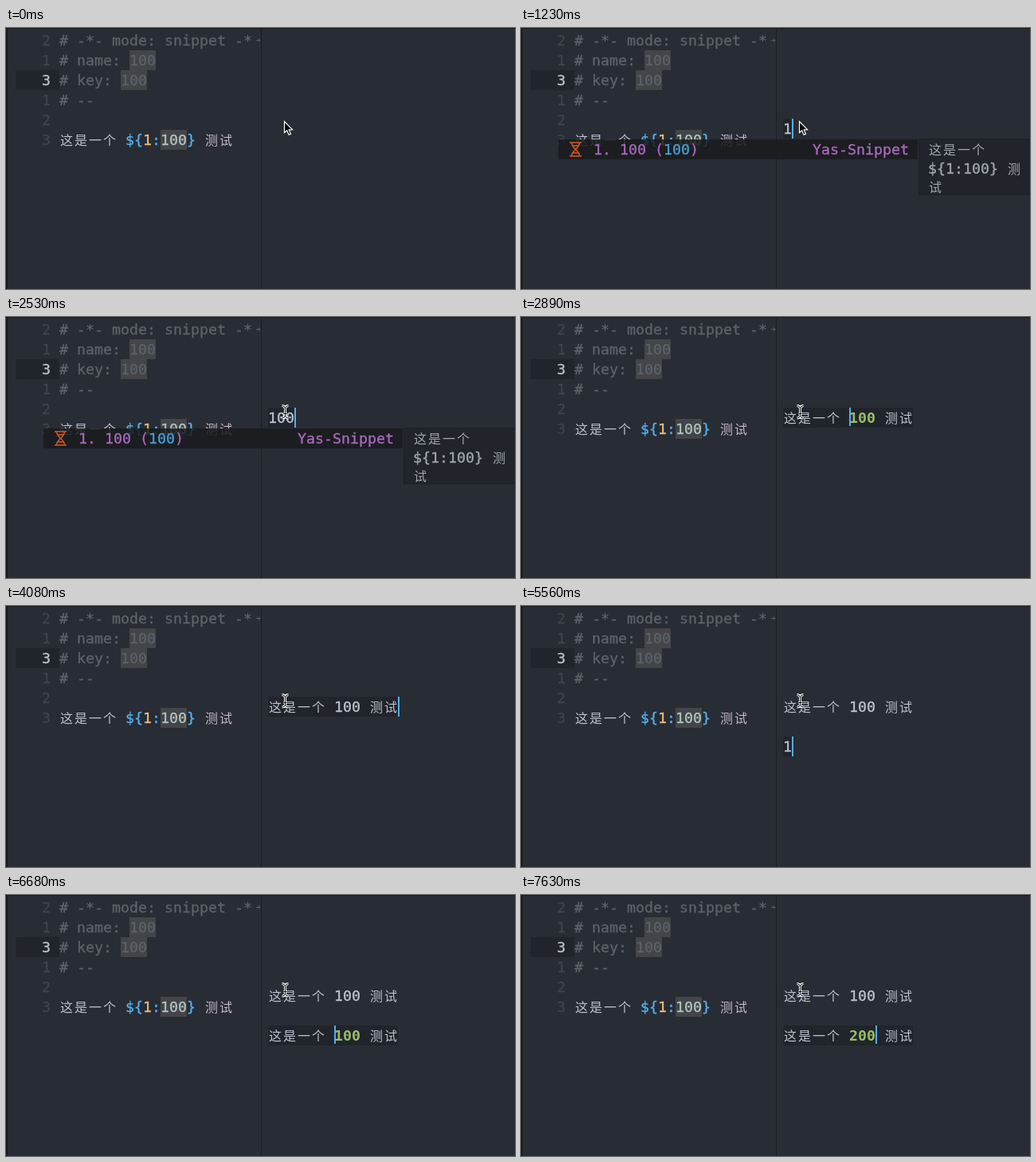
An HTML page with a canvas for the animation above (8000 ms loop, 639 by 328 pixels).

```html
<!DOCTYPE html>
<html lang="zh">
<head>
<meta charset="utf-8">
<title>Snippet expansion</title>
<style>
html, body { margin: 0; width: 100%; height: 100%; overflow: hidden; background: #282c34; }
canvas { display: block; }
</style>
</head>
<body>
<canvas id="stage" width="639" height="328"></canvas>
<script>
const ctx = document.getElementById('stage').getContext('2d');
const LOOP = 8000, CELL = 11, WIDE = 18, ROW = 25;
const LEFT_X = 67, LEFT_Y = 3, RIGHT_X = 329, RIGHT_Y = 114;

const C = {
  bg: '#282c34', line: '#21242b', edge: '#17191e', dim: '#3f444a',
  comment: '#5b6268', fg: '#bbc2cf', mark: '#434548', blue: '#51afef',
  orange: '#ecbe7b', green: '#98be65', value: '#b0c4bf', pink: '#c3b7c7',
  purple: '#a968bd', doc: '#a0a5ae', icon: '#cf5625'
};

const snippet = n => `这是一个 ${n} 测试`;

// Each step overrides part of the state: row, col and on describe the caret.
const steps = [
  [0, { first: '', third: '', row: 0, col: 0, on: false, block: false, popup: false, beam: false, field: -1 }],
  [410, { on: true, block: true }],
  [470, { block: false }],
  [940, { on: false }],
  [1000, { first: '1', col: 1, on: true }],
  [1230, { popup: true }],
  [1290, { first: '10', col: 2, popup: false }],
  [1470, { beam: true }],
  [1530, { popup: true }],
  [1580, { first: '100', col: 3, popup: false }],
  [1810, { popup: true }],
  [2050, { on: false }],
  [2530, { on: true }],
  [2890, { first: snippet(100), col: 5, field: 0, popup: false }],
  [3370, { on: false }],
  [3900, { on: true }],
  [4080, { col: 11, field: -1 }],
  [4620, { on: false }],
  [4850, { row: 1, col: 0, on: true }],
  [5270, { row: 2 }],
  [5560, { third: '1', col: 1 }],
  [5800, { popup: true }],
  [5860, { third: '10', col: 2, popup: false }],
  [5970, { third: '100', col: 3 }],
  [6210, { popup: true }],
  [6500, { on: false }],
  [6680, { third: snippet(100), col: 5, field: 2, on: true, popup: false }],
  [7160, { on: false }],
  [7220, { third: snippet(2), col: 6, on: true }],
  [7520, { third: snippet(20), col: 7 }],
  [7630, { third: snippet(200), col: 8 }]
];

function stateAt(t) {
  return Object.assign({}, ...steps.filter(s => s[0] <= t).map(s => s[1]));
}

const isWide = ch => ch > '\u2fff';
const widthOf = s => [...s].reduce((w, ch) => w + (isWide(ch) ? WIDE : CELL), 0);

function rect(x, y, w, h, color) {
  ctx.fillStyle = color;
  ctx.fillRect(x, y, w, h);
}

// Draws on the editor's character grid and returns the end position.
// A hairline stroke gives Latin text its medium weight.
function write(s, x, base, color, bold = false) {
  ctx.fillStyle = ctx.strokeStyle = color;
  ctx.textAlign = 'center';
  ctx.lineWidth = 0.35;
  for (const ch of s) {
    const wide = isWide(ch);
    const w = wide ? WIDE : CELL;
    ctx.font = wide
      ? '16px "Noto Sans CJK SC", "Noto Sans CJK", sans-serif'
      : `${bold ? 'bold ' : ''}18.27px "DejaVu Sans Mono", monospace`;
    ctx.fillText(ch, x + w / 2, base);
    if (!wide && !bold) ctx.strokeText(ch, x + w / 2, base);
    x += w;
  }
  return x;
}

function writeAll(parts, x, base) {
  for (const [s, color, bold] of parts) x = write(s, x, base, color, bold);
}

function path(points, close) {
  ctx.beginPath();
  points.forEach(([x, y]) => ctx.lineTo(x, y));
  if (close) ctx.closePath();
}

function drawLeft() {
  const top = i => LEFT_Y + i * ROW;
  const base = i => top(i) + 19;
  rect(12, top(2), 55, ROW, C.line);
  rect(155, top(1), 33, ROW, C.mark);
  rect(144, top(2), 33, ROW, C.mark);
  rect(194, top(5), 33, ROW, C.mark);
  [...'213123'].forEach((n, i) => write(n, 45, base(i), i === 2 ? C.fg : C.dim));
  ['# -*- mode: snippet -*', '# name: 100', '# key: 100', '# --']
    .forEach((s, i) => write(s, LEFT_X, base(i), C.comment));
  writeAll([
    ['这是一个 ', C.fg], ['${', C.blue], ['1', C.orange], [':', C.blue],
    ['100', C.value], ['}', C.blue], [' 测试', C.pink]
  ], LEFT_X, base(5));

  // Truncation arrow in the fringe.
  ctx.strokeStyle = C.comment;
  ctx.lineWidth = 1;
  path([[314, 15.5], [319, 15.5]]);
  ctx.stroke();
  path([[316.5, 13], [319, 15.5], [316.5, 18]]);
  ctx.stroke();
}

function drawRight(s) {
  const lines = [s.first, '', s.third];
  const top = RIGHT_Y + s.row * ROW;
  rect(RIGHT_X, top, widthOf(lines[s.row]), ROW, C.line);
  lines.forEach((text, i) => {
    const parts = text.split(/(\d+)/).map(p => {
      const live = i === s.field && /\d/.test(p);
      return [p, live ? C.green : C.fg, live];
    });
    writeAll(parts, RIGHT_X, RIGHT_Y + i * ROW + 19);
  });
  if (s.on) {
    const x = RIGHT_X + widthOf(lines[s.row].slice(0, s.col));
    rect(x, top, s.block ? CELL : 2, s.field < 0 ? ROW : 23, C.blue);
  }
}

function drawHourglass(x, y) {
  ctx.strokeStyle = ctx.fillStyle = C.icon;
  ctx.lineWidth = 1.6;
  path([[x, y + 1], [x + 15, y + 1]]);
  ctx.stroke();
  path([[x, y + 18], [x + 15, y + 18]]);
  ctx.stroke();
  ctx.beginPath();
  ctx.moveTo(x + 2.5, y + 1);
  ctx.bezierCurveTo(x + 2.5, y + 9, x + 12.5, y + 10, x + 12.5, y + 18);
  ctx.moveTo(x + 12.5, y + 1);
  ctx.bezierCurveTo(x + 12.5, y + 9, x + 2.5, y + 10, x + 2.5, y + 18);
  ctx.stroke();
  path([[x + 4, y + 5], [x + 11, y + 5]]);
  ctx.stroke();
  path([[x + 4, y + 14], [x + 11, y + 14]]);
  ctx.stroke();
}

function drawPopup(y) {
  rect(47, y + 1, 451, 25, 'rgba(25,27,30,0.86)');
  rect(500, y + 1, 139, 70, 'rgba(33,36,42,0.95)');
  ctx.strokeStyle = '#1d2025';
  ctx.lineWidth = 1;
  ctx.strokeRect(499.5, y + 0.5, 140, 70);
  drawHourglass(61, y + 4);
  const base = y + 20;
  writeAll([['1. 100 (', C.purple], ['100', '#4a9fd6'], [')', C.purple]], 91, base);
  write('Yas-Snippet', 366, base, C.purple);
  write('这是一个', 511, base, C.doc);
  write('${1:100} 测', 511, base + 24, C.doc);
  write('试', 511, base + 47, C.doc);
}

function drawArrow() {
  const shape = [[0, 0], [0, 14], [3.2, 11.2], [5.6, 16.8], [8, 15.7], [5.7, 10.4], [10, 10.2]];
  path(shape.map(([x, y]) => [x + 349.5, y + 117.5]), true);
  ctx.fillStyle = '#000';
  ctx.fill();
  ctx.strokeStyle = '#fff';
  ctx.lineWidth = 1.2;
  ctx.stroke();
}

function drawBeam() {
  for (const [color, width] of [['#fff', 3], ['#111', 1]]) {
    ctx.strokeStyle = color;
    ctx.lineWidth = width;
    ctx.beginPath();
    ctx.moveTo(346.5, 111.5);
    ctx.quadraticCurveTo(350, 111.5, 350.5, 115);
    ctx.quadraticCurveTo(351, 111.5, 354.5, 111.5);
    ctx.moveTo(350.5, 115);
    ctx.lineTo(350.5, 124);
    ctx.moveTo(346.5, 127);
    ctx.quadraticCurveTo(350, 127, 350.5, 124);
    ctx.quadraticCurveTo(351, 127, 354.5, 127);
    ctx.moveTo(348.5, 121.5);
    ctx.lineTo(352.5, 121.5);
    ctx.stroke();
  }
}

function draw(t) {
  const s = stateAt(t);
  rect(0, 0, 639, 328, C.bg);
  drawLeft();
  rect(320, 2, 1, 326, '#1b1e23');
  drawRight(s);
  rect(0, 0, 639, 1, C.edge);
  rect(0, 0, 2, 328, C.edge);
  if (s.popup) drawPopup(RIGHT_Y + (s.row + 1) * ROW);
  if (s.beam) drawBeam();
  else drawArrow();
}

const start = performance.now();
function tick() {
  draw((performance.now() - start) % LOOP);
  requestAnimationFrame(tick);
}
tick();
</script>
</body>
</html>
```
